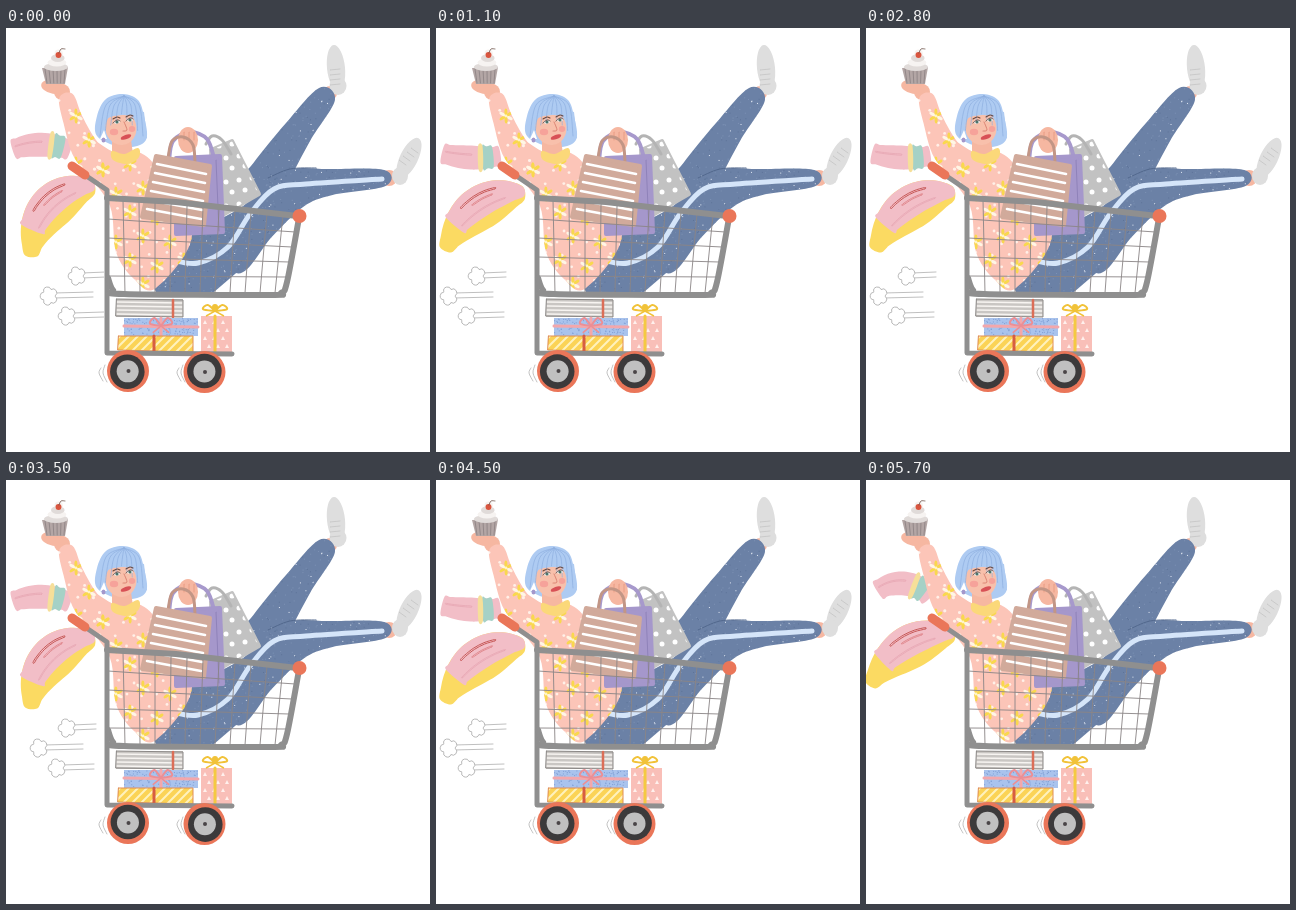
An HTML page with a canvas for the animation above (5800 ms loop, 424x424 px).

```html
<!DOCTYPE html>
<html lang="en">
<head>
<meta charset="utf-8">
<title>Shopping cart ride</title>
<style>
html, body { margin: 0; width: 100%; height: 100%; overflow: hidden; background: #fff; }
canvas { display: block; width: 424px; height: 424px; }
</style>
</head>
<body>
<canvas id="stage" width="424" height="424"></canvas>
<script>
const SIZE = 424, LOOP = 5800, STEP = 100, CYCLE = 17;
const GREY = '#8f8f8f', ORANGE = '#ea7659', SKIN = '#f6b7a1', YELLOW = '#fbda62',
  PINK = '#fcc5b8', ROSE = '#f2bec7', JEANS = '#6b81a6', HAIR = '#aecbf2', INK = '#4a4547';
const screen = document.getElementById('stage').getContext('2d');
let g = screen;

let seed = 7;
const random = () => (seed = (seed * 16807) % 2147483647) / 2147483647;
const lerp = (a, b, u) => a + (b - a) * u;
const repeat = (n, draw) => { for (let i = 0; i < n; i++) draw(i, i / (n - 1)); };
const mirrored = draw => [-1, 1].forEach(draw);

function poly(p, closed = true) {
  const path = new Path2D();
  for (let i = 0; i < p.length; i += 2) path.lineTo(p[i], p[i + 1]);
  if (closed) path.closePath();
  return path;
}

// Catmull-Rom curve through the listed points
function curve(p, closed = true) {
  const n = p.length / 2, path = new Path2D();
  const at = i => {
    const j = closed ? (i + n) % n : Math.max(0, Math.min(n - 1, i));
    return [p[2 * j], p[2 * j + 1]];
  };
  path.moveTo(p[0], p[1]);
  for (let i = 0; i < (closed ? n : n - 1); i++) {
    const [a, b, c, d] = [at(i - 1), at(i), at(i + 1), at(i + 2)];
    path.bezierCurveTo(b[0] + (c[0] - a[0]) / 6, b[1] + (c[1] - a[1]) / 6,
      c[0] - (d[0] - b[0]) / 6, c[1] - (d[1] - b[1]) / 6, c[0], c[1]);
  }
  return path;
}

function fill(path, color) { g.fillStyle = color; g.fill(path); }
function line(path, color, width) {
  g.strokeStyle = color;
  g.lineWidth = width;
  g.stroke(path);
}
const blob = (color, ...p) => fill(curve(p), color);
const shape = (color, ...p) => fill(poly(p), color);
const stroke = (color, width, ...p) => line(poly(p, false), color, width);
const bend = (color, width, ...p) => line(curve(p, false), color, width);
const rect = (color, x, y, w, h) => { g.fillStyle = color; g.fillRect(x, y, w, h); };

function dot(x, y, r, color, ry = r, turn = 0) {
  g.fillStyle = color;
  g.beginPath();
  g.ellipse(x, y, r, ry, turn, 0, 7);
  g.fill();
}

function inside(path, draw) {
  g.save();
  g.clip(path);
  draw();
  g.restore();
}

function specks(x, y, w, h, count, color) {
  repeat(count, () => rect(color, x + random() * w, y + random() * h, 1, 1));
}

// Outline of a spine of [x, y, half width]; lo and hi pick a part of its width
function tube(spine, lo = -1, hi = 1) {
  const edge = side => spine.map(([x, y, w], i) => {
    const a = spine[Math.max(0, i - 1)], b = spine[Math.min(spine.length - 1, i + 1)];
    const dx = b[0] - a[0], dy = b[1] - a[1], k = side * w / Math.hypot(dx, dy);
    return [x - dy * k, y + dx * k];
  });
  return curve([...edge(lo), ...edge(hi).reverse()].flat());
}

function legs() {
  dot(324, 65, 7, SKIN);
  dot(383, 150, 8, SKIN);
  dot(330, 40, 9, '#dedede', 23, -.1);
  dot(332, 58, 8.5, '#dedede', 9);
  dot(403, 130, 9, '#dedede', 22, .45);
  dot(394, 148, 8, '#dedede', 9);
  repeat(4, i => {
    stroke('#c4c4c4', .8, 324, 42 + i * 5, 334, 41 + i * 5);
    stroke('#c4c4c4', .8, 393 + i * 4, 132 - i * 4, 400 + i * 4, 137 - i * 4);
  });

  const back = tube([[321, 66, 10], [292, 104, 15], [264, 146, 20], [248, 172, 22]]);
  const front = tube([[379, 150, 8], [325, 154, 13], [288, 161, 20], [252, 193, 21], [215, 226, 26]]);
  const hip = poly([148, 260, 186, 207, 240, 190, 236, 240, 208, 264, 150, 264]);
  for (const part of [back, front, hip]) {
    fill(part, JEANS);
    inside(part, () => {
      specks(148, 60, 235, 205, 900, '#7e93b5');
      specks(148, 60, 235, 205, 350, '#5d7398');
      specks(148, 60, 235, 205, 160, '#e3eaf4');
    });
  }
  bend('#52688d', 1, 262, 150, 284, 141, 310, 140);
  bend('#d5e5f9', 5, 166, 232, 192, 235, 222, 219, 244, 186, 268, 161, 300, 156, 376, 151);
}

function flower(x, y) {
  repeat(6, i => {
    const a = i * Math.PI / 3 + .5;
    dot(x + 4 * Math.cos(a), y + 4 * Math.sin(a), 3.4, i % 3 ? '#f9d84e' : '#fff6e4', 1.5, a);
  });
  dot(x, y, 1.4, '#fff4c4');
}

function sweaterPrint() {
  repeat(17, row => repeat(9, i =>
    dot(53 + i * 16 + row % 2 * 8 + random() * 4, 68 + row * 12 + random() * 5, 1.4, '#fff0e8')));
  repeat(8, row => repeat(5, i =>
    flower(70 + i * 27 + row % 2 * 13, 88 + row * 24 + i % 2 * 6)));
}

function body() {
  dot(48, 59, 13, SKIN, 7, .2);
  dot(56, 64, 8, SKIN);
  const torso = curve([84, 112, 108, 124, 132, 124, 152, 142, 186, 206, 150, 260, 128, 251, 110, 224, 104, 178, 78, 138]);
  const arm = tube([[60, 68, 7], [67, 92, 10], [80, 122, 14], [100, 140, 14]]);
  for (const part of [torso, arm]) fill(part, PINK);
  for (const part of [torso, arm]) {
    seed = 7;
    inside(part, sweaterPrint);
  }
}

function cupcake() {
  shape('#b3a6a5', 36, 40, 62, 39, 59, 56, 40, 56);
  repeat(6, i => stroke('#8b8182', .8, 39 + i * 4, 41, 41 + i * 3.4, 55));
  repeat(4, i => dot(50 + i * .9, 39 - i * 4.5, 12 - i * 2.6, i % 2 ? '#f6f3f1' : '#e0dbd9', 4));
  dot(52.5, 27, 3, '#d9553f');
  bend('#6b5147', .8, 53, 25, 55, 21, 59, 21);
}

function head() {
  blob(HAIR, 91, 108, 91, 88, 100, 71, 117, 66, 132, 72, 138, 88, 141, 108, 134, 117, 114, 119);
  shape(SKIN, 106, 108, 125, 112, 127, 126, 115, 132, 106, 124);
  dot(115, 100, 15.5, '#f8c0ab', 17, -.15);
  blob(HAIR, 96, 104, 93, 86, 104, 70, 122, 69, 134, 80, 133, 88, 116, 87, 101, 91);
  shape(HAIR, 129, 82, 138, 84, 141, 110, 130, 116, 131, 98);
  repeat(9, (i, u) => bend('#8fafe0', .7, 118, 68, lerp(100, 133, u), 77, lerp(94, 137, u), 86 + 22 * Math.abs(2 * u - 1)));
  dot(108, 104, 4.2, '#f6a29a', 3.2);
  dot(126, 101, 3.2, '#f6a29a', 3);
  for (const [x, y] of [[111, 94], [124, 92]]) {
    bend('#69473e', 1.1, x - 4, y - 3, x, y - 5, x + 3, y - 4);
    dot(x, y, 3, '#fff', 1.6, -.2);
    dot(x, y, 1.6, '#4d746b');
    bend(INK, .9, x - 4, y + 1, x, y - 2, x + 3, y - 1);
  }
  bend('#dc8473', 1, 118, 94, 121, 102, 117, 103);
  dot(120, 109, 5.5, '#d85156', 2.2, -.35);
  shape('#fff', 98, 102, 101, 111, 94, 111);
  dot(97.5, 112, 2, '#a597cb', 2.5);
  blob('#fbd879', 106, 123, 118, 126, 132, 120, 133, 129, 122, 136, 107, 132);
}

// Quadrilateral with rounded corners
function bag(color, ...corners) {
  const path = poly(corners);
  fill(path, color);
  line(path, color, 4);
  return path;
}

function bags() {
  inside(bag('#c2c2c2', 205, 122, 226, 113, 253, 166, 208, 192), () =>
    repeat(6, row => repeat(5, i =>
      dot(200 + i * 13 + row % 2 * 7, 120 + row * 12 - i * 2, 2.5, '#fff'))));
  bend('#b4b4b4', 3, 200, 116, 206, 108, 216, 112, 225, 126);
  bend('#a799cc', 4, 163, 133, 167, 113, 184, 104, 201, 111, 208, 130);
  bag('#a597cb', 170, 130, 214, 128, 217, 204, 170, 206);
  stroke('#8f82b9', 1, 210, 132, 213, 203);
  dot(182, 112, 10, SKIN, 13);
  repeat(3, i => stroke('#e6977f', .8, 178 + i * 5, 104, 178 + i * 5, 112));
  bend('#c29686', 3, 162, 130, 166, 113, 177, 109, 187, 117, 189, 135);
  bag('#d1aa9b', 150, 128, 204, 138, 198, 197, 136, 189);
  repeat(6, i => stroke('#fff', 2.6, 151 - i * 2, 136 + i * 9, 200 - i, 146 + i * 9));
}

function bow(x, y, color, w, h) {
  mirrored(s => {
    bend(color, 2, x, y, x + s * w * .6, y - h, x + s * w, y - h * .3, x, y);
    bend(color, 1.6, x, y, x + s * w * .7, y + h * .8);
  });
}

function gifts() {
  rect('#c9c6c3', 110, 271, 67, 18);
  repeat(4, i => stroke('#f7f4f1', 1.3, 111, 274 + i * 4, 176, 275 + i * 4));
  line(poly([110, 271, 177, 272, 177, 289, 110, 288]), '#8c8987', 1);
  stroke('#db6e58', 2.5, 167, 272, 167, 289);

  rect('#a9c3ed', 118, 290, 74, 18);
  specks(118, 290, 73, 17, 130, '#7f9dd3');
  stroke('#f3a7ab', 3, 118, 298, 192, 299);
  stroke('#f3a7ab', 3, 155, 290, 155, 308);
  bow(155, 298, '#ec8f95', 11, 8);

  const yellowBox = poly([112, 308, 187, 308, 187, 324, 112, 322]);
  fill(yellowBox, '#fbd356');
  inside(yellowBox, () => repeat(11, i => stroke('#fff2bd', 2, 98 + i * 9, 324, 114 + i * 9, 308)));
  line(yellowBox, '#e08d54', 1);
  stroke('#d75d42', 3, 148, 308, 148, 324);

  rect('#f9bfb8', 195, 288, 31, 36);
  repeat(4, row => repeat(3, i => {
    const x = 199 + i * 9 + row % 2 * 4, y = 294 + row * 8;
    shape('#fff0ec', x - 2, y + 2, x + 2, y + 2, x, y - 2);
  }));
  stroke('#f4c942', 3, 209, 288, 209, 324);
  bow(209, 283, '#f1c238', 12, 6);
  dot(209, 279, 3, '#f1c238');
}

function cart() {
  repeat(11, i => stroke('#8b8586', .9, 117 + i * 16, 172 + i * 1.5, 119 + i * 15, 265));
  repeat(4, i => stroke('#8b8586', .9, 102, 191 + i * 19, 289 - i * 3, 204 + i * 15));
  stroke(GREY, 5, 76, 145, 101, 162, 101, 325, 226, 326);
  stroke(GREY, 6, 101, 170, 170, 174, 291, 188);
  bend(GREY, 6, 293, 190, 281, 254, 275, 265, 262, 267, 118, 266, 107, 262, 102, 250);
  stroke(ORANGE, 9, 66, 138, 79, 147);
  dot(293.5, 188, 7, ORANGE);
}

function motionMarks() {
  for (const x of [98, 176])
    repeat(2, i => bend('#b3b3b3', .8, x - i * 4 + 1, 337 + i * 3, x - i * 4 - 1, 345, x - i * 4 + 3, 354 - i));
}

function wheel(x, y, k) {
  const a = k * 2.3;
  dot(x, y, 21, ORANGE);
  dot(x + Math.cos(a), y + Math.sin(a), 17.3, '#3c3a3b');
  dot(x + .5 * Math.cos(a), y + .5 * Math.sin(a), 11, '#c0c0c0');
  dot(x + .5, y, 2, INK);
}

function cloud(x, y, length) {
  stroke('#b8b8b8', .9, x + 5, y - 3, x + length, y - 4);
  stroke('#b8b8b8', .9, x + 5, y + 2, x + length, y + 1);
  const puff = new Path2D();
  repeat(5, i => {
    const a = .65 + i * 1.25;
    puff.arc(x + 5 * Math.cos(a), y + 5.5 * Math.sin(a), 3.8, a - 1.5, a + 1.5);
  });
  puff.closePath();
  fill(puff, '#fff');
  line(puff, '#b0b0b0', .9);
}

// Clouds slide left, vanish for one step and start again
function clouds(k) {
  const beat = k % 8;
  if (beat === 7) return;
  const shift = 10 - beat * 10;
  inside(poly([0, 236, 98, 236, 98, 306, 0, 306]), () => {
    cloud(71 + shift, 248, 29);
    cloud(43 + shift, 268, 44);
    cloud(61 + shift, 288, 37);
  });
}

// Spine heading left, raised by lift and arched by curl; from and to cut out a part
function ribbon(x, y, length, lift, curl, width, from = 0, to = 1) {
  const spine = [], n = 40;
  for (let i = 0; i <= n; i++) {
    const u = i / n, a = lift + curl * (1 - 2 * u);
    if (u >= from && u <= to) spine.push([x, y, width(u)]);
    x -= length / n * Math.cos(a);
    y -= length / n * Math.sin(a);
  }
  return spine.filter((_, i) => i % 4 === 0 || i === spine.length - 1);
}

const POSES = {
  low: { drop: 0, lift: 0, curl: .35, hang: -.85 },
  rising: { drop: -4, lift: .5, curl: .6, hang: -.45 },
  high: { drop: -5, lift: .1, curl: .75, hang: -.56 },
  peak: { drop: -5, lift: .75, curl: .5, hang: -.35 },
  wide: { drop: 6, lift: .05, curl: -.2, hang: -.64 }
};

function scarf({ drop, lift, curl, hang }) {
  const upper = (from, to) => ribbon(64, 122 + drop, 58, lift, curl, u => 9 + 3 * Math.sin(u * Math.PI), from, to);
  fill(tube(upper()), ROSE);
  fill(tube(upper(.12, .3)), '#a5d1c6');
  fill(tube(upper(.3, .38)), '#f6df99');
  line(tube(upper(.5, .95), .2, .3), '#e5a4b1', .7);

  const lower = (from, to) => ribbon(88, 159 + drop, 102, hang, -hang * .85,
    u => 6 + 16 * Math.sin(Math.PI * Math.pow(u, .85)), from, to);
  fill(tube(lower()), YELLOW);
  fill(tube(lower(0, .75), -.45, 1), ROSE);
  line(tube(lower(.25, .6), .55, .62), '#c75958', 1);
  line(tube(lower(.3, .5), .3, .35), '#dc7d82', .8);
  line(tube(lower(.2, .72), -.1, -.05), '#e5a4b1', .7);
}

function poseAt(k) {
  if (k < 3) return POSES.low;
  if (k < 5) return POSES.rising;
  if (k < 8) return POSES.high;
  return k < 12 ? POSES.peak : POSES.wide;
}

const still = document.createElement('canvas');
still.width = still.height = SIZE;
g = still.getContext('2d');
g.lineCap = g.lineJoin = 'round';
[legs, body, cupcake, head, bags, gifts, cart, motionMarks].forEach(draw => draw());
g = screen;
g.lineCap = g.lineJoin = 'round';

function render(time) {
  const k = (Math.floor(time % LOOP / STEP) + 1) % CYCLE;
  const moving = Math.min(k, CYCLE - 2);
  rect('#fff', 0, 0, SIZE, SIZE);
  clouds(moving);
  scarf(poseAt(k));
  g.drawImage(still, 0, 0);
  wheel(122, 343, moving);
  wheel(198.5, 344, moving + 1);
}

const start = performance.now();
function tick() {
  render(performance.now() - start);
  requestAnimationFrame(tick);
}
tick();
</script>
</body>
</html>
```
